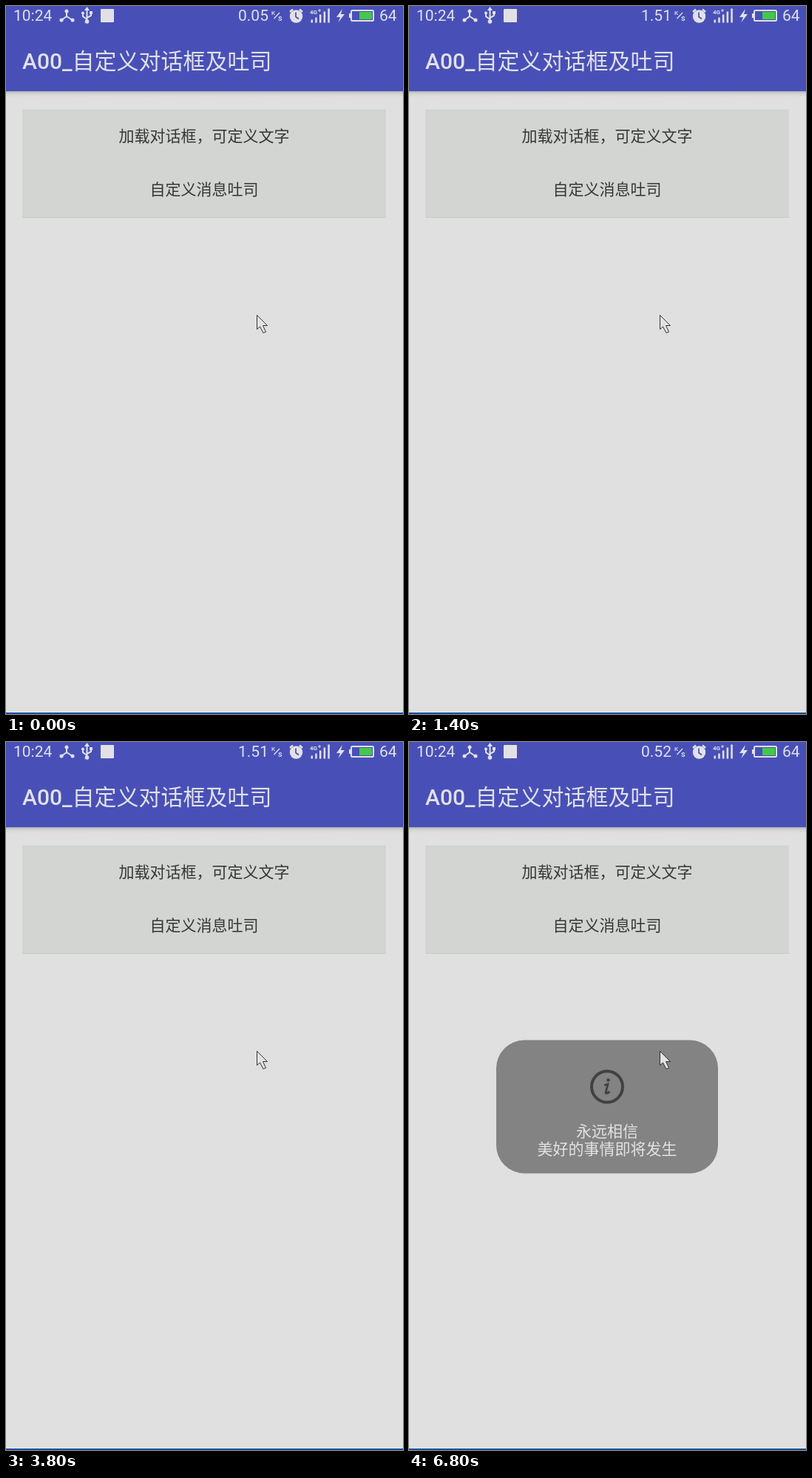
Write an HTML page that moves like this. It is 537x956 px and loops after 8000 ms.

```html
<!DOCTYPE html>
<html lang="zh-CN">
<head>
<meta charset="utf-8">
<style>
html, body { margin: 0; width: 100%; height: 100%; overflow: hidden; background: #dfe0df; }
svg { display: block; width: 100vw; height: 100vh; }
text { font-family: Roboto, "Noto Sans CJK SC", "Noto Sans CJK", sans-serif; }
.status { font-size: 21px; fill: #e1e1e5; }
.label { font-size: 21px; fill: #353535; text-anchor: middle; }
.message { font-size: 21px; fill: #e2e2e2; text-anchor: middle; }
</style>
</head>
<body>
<svg viewBox="0 0 537 956" preserveAspectRatio="none">
  <defs>
    <linearGradient id="shade" x2="0" y2="1">
      <stop stop-color="#aeafb2"/>
      <stop offset=".35" stop-color="#cfd0d0"/>
      <stop offset="1" stop-color="#dfe0df"/>
    </linearGradient>
  </defs>
  <rect width="537" height="956" fill="#dfe0df"/>
  <rect y="115" width="537" height="8" fill="url(#shade)"/>
  <rect width="537" height="115" fill="#4850b8"/>

  <g fill="#e1e1e5" stroke="none">
    <text class="status" x="10" y="20">10:24</text>
    <g stroke="#e1e1e5" stroke-width="2" fill="none">
      <path d="M82 7V14L75 19M82 14L90 19"/>
      <path d="M109.500 5V20M104 10V14L109.500 18M115 9V13L109.500 16"/>
    </g>
    <circle cx="82" cy="7" r="2.500"/>
    <circle cx="75" cy="19" r="2.500"/>
    <circle cx="90" cy="19" r="2.500"/>
    <path d="M109.500 1L113 6H106Z"/>
    <circle cx="109.500" cy="21" r="2.800"/>
    <circle cx="104" cy="9.500" r="2"/>
    <rect x="113" y="7" width="4" height="4"/>
    <rect x="128" y="4" width="18" height="18" rx="1"/>

    <text id="rate" class="status" x="314" y="20"></text>
    <text x="359" y="12" font-size="8" font-weight="500">K</text>
    <text x="368" y="20" font-size="11" font-weight="500">s</text>
    <path d="M362.500 17L370 9" stroke="#e1e1e5" stroke-width="1.200"/>

    <circle cx="392.500" cy="14" r="8.700"/>
    <path d="M384 8L388 4.500M401 8L397 4.500" stroke="#e1e1e5" stroke-width="2.500"/>
    <path d="M392 8.500V14.500L396 17.500" fill="none" stroke="#4850b8" stroke-width="1.700"/>

    <text x="411" y="11" font-size="8" font-weight="700">4G</text>
    <path d="M422 6H426M424 4V8" stroke="#e1e1e5"/>
    <g id="signal"></g>
    <path d="M455 4L447 15H452L449.500 22L458 11H453Z"/>
    <rect x="467" y="6" width="30" height="14" rx="1.500" fill="none" stroke="#e1e1e5" stroke-width="2"/>
    <rect x="464" y="10" width="2" height="6"/>
    <rect x="478" y="8" width="17" height="10" fill="#45c748"/>
    <text class="status" x="505" y="20">64</text>
  </g>

  <text x="22" y="85" font-size="30" fill="#e1e1e6"><tspan font-weight="500">A00_</tspan><tspan>自定义对话框及吐司</tspan></text>

  <rect x="22" y="139.500" width="492" height="146" fill="#d2d5d2"/>
  <path d="M22 285.500H514" stroke="#c8cac8"/>
  <text class="label" x="268" y="183">加载对话框，可定义文字</text>
  <text class="label" x="268" y="255">自定义消息吐司</text>

  <g id="toast">
    <rect x="118" y="402.500" width="300" height="180" rx="38" fill="#838383"/>
    <circle cx="268" cy="465.500" r="21" fill="none" stroke="#414141" stroke-width="4"/>
    <circle cx="269.500" cy="456.500" r="2.300" fill="#414141"/>
    <path d="M264 463.500L269 462L266 473.500Q266 476 271.500 472" fill="none" stroke="#414141" stroke-width="2.800"/>
    <text class="message" x="268" y="532.500">永远相信</text>
    <text class="message" x="268" y="557">美好的事情即将发生</text>
  </g>

  <path d="M339.500 417.500V436.500L343.500 433L348 441.500L351.500 440L347.500 431.500H353.500Z" fill="#e2e2e2" stroke="#333" stroke-width="1"/>
  <rect y="954" width="537" height="2" fill="#1f4e9e"/>
</svg>
<script>
const LOOP = 8000;
const rates = [[0, "0.05"], [500, "1.51"], [5000, "0.52"]];
const rate = document.getElementById("rate");
const toast = document.getElementById("toast");

const heights = [4, 7, 11, 15, 19];
document.getElementById("signal").innerHTML = heights.map((h, i) =>
  `<rect x="${412.500 + i * 5.700}" y="${22.500 - h}" width="2.500" height="${h}"/>`).join("");

function draw(t) {
  rate.textContent = rates.filter(r => r[0] <= t).pop()[1];
  toast.setAttribute("visibility", t >= 5000 ? "visible" : "hidden");
}

const start = performance.now();
function tick() {
  draw((performance.now() - start) % LOOP);
  requestAnimationFrame(tick);
}
tick();
</script>
</body>
</html>
```
